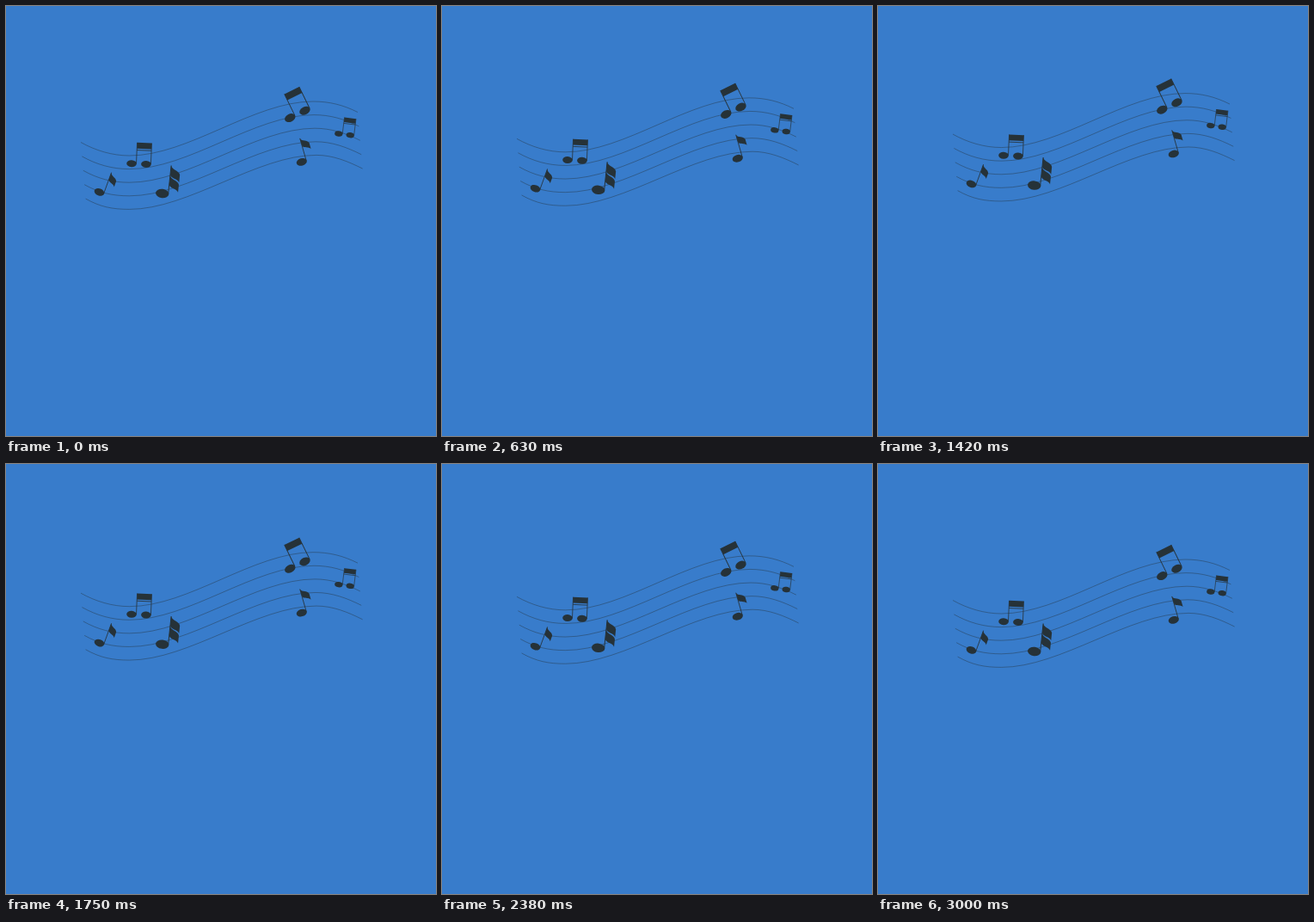
An HTML page that plays this animation: 500 by 500 pixels, repeating every 3040 ms.

```html
<!DOCTYPE html>
<html lang="en">
<head>
<meta charset="utf-8">
<title>Floating notes</title>
<style>
  html, body { margin: 0; width: 100%; height: 100%; overflow: hidden; background: #387ccb; }
  svg { display: block; width: 100vw; height: 100vh; }
  .line { fill: none; stroke: #263238; stroke-width: .42; }
  .note { fill: #263238; }
  .stem { fill: none; stroke: #263238; stroke-width: .8; }
</style>
</head>
<body>
<svg viewBox="0 0 500 500"><g id="music"></g></svg>
<script>
  const music = document.getElementById('music');

  function add(parent, tag, attrs) {
    const el = document.createElementNS('http://www.w3.org/2000/svg', tag);
    for (const key in attrs) el.setAttribute(key, attrs[key]);
    parent.append(el);
    return el;
  }

  // one staff line: dips on the left, crests on the right
  function staffLine(i) {
    const gap = 15.6 * i, fan = 16.4 * i, shift = 1.4 * i;
    const low = 174 + gap, high = 111 + gap;
    const left = 87 + shift, right = 409 + shift;
    const start = 158.5 + fan, end = 123.5 + fan;
    const dip = 143.5, crest = 357 + i;
    add(music, 'path', { class: 'line', d:
      `M${left} ${start}C${left + 17} ${start + 9.5} ${dip - 20} ${low} ${dip} ${low}` +
      `C${dip + 69} ${low} ${crest - 69} ${high} ${crest} ${high}` +
      `C${crest + 19} ${high} ${right - 17} ${end - 8.5} ${right} ${end}` });
  }

  // notes are drawn around the centre of their first head, upright at size 1
  const noteGroup = (x, y, size, tilt) => add(music, 'g', {
    class: 'note', transform: `translate(${x} ${y}) rotate(${tilt}) scale(${size})`
  });
  const head = (g, cx, rx, ry) => add(g, 'ellipse', { cx, rx, ry });
  const stem = (g, d) => add(g, 'path', { class: 'stem', d });

  function flagged(x, y, size, tilt, flags) {
    const g = noteGroup(x, y, size, tilt);
    const side = 5.6, top = -27;
    head(g, 0, 6.2, 4.2);
    stem(g, `M${side} 0V${top}`);
    for (let i = 0; i < flags; i++)
      add(g, 'path', {
        d: 'M0 0C1.5 4.5 7.5 3.5 9 7.9V15.2C7.5 11.5 .5 12.5 0 8.6Z',
        transform: `translate(${side} ${top + 9.3 * i})`
      });
  }

  function beamed(x, y, size, tilt, beams) {
    const g = noteGroup(x, y, size, tilt);
    const gap = 16.9, side = 5.5, top = -24.6, thick = 6.9;
    for (const cx of [0, gap]) {
      head(g, cx, 5.8, 4);
      stem(g, `M${cx + side} 0V${top}`);
    }
    add(g, 'path', { d: `M${side} ${top}h${gap}v${thick}h${-gap}Z` });
    if (beams > 1) stem(g, `M${side} ${top + thick + 1.8}h${gap}`);
  }

  for (let i = 0; i < 5; i++) staffLine(i);
  flagged(108.5, 216.4, .97, 20, 1);
  flagged(181.7, 218, 1.24, 6, 2);
  flagged(343.8, 181.4, 1, -16, 1);
  beamed(146, 183.2, 1, 2.5, 2);
  beamed(330.3, 130.1, 1.13, -26, 1);
  beamed(386.8, 148.5, .8, 7, 2);

  // linear rise and fall in 72 steps at 24 per second, plus a short rest
  const LOOP = 3040, STEPS = 72, RATE = 24, RISE = 10;

  function draw(now) {
    const step = Math.min(STEPS, Math.floor((now % LOOP + 4.9) * RATE / 1000));
    const half = STEPS / 2;
    const y = -RISE * (1 - Math.abs(step - half) / half);
    music.setAttribute('transform', `translate(0 ${y})`);
  }

  const start = performance.now();
  function tick() {
    draw(performance.now() - start);
    requestAnimationFrame(tick);
  }
  tick();
</script>
</body>
</html>
```
